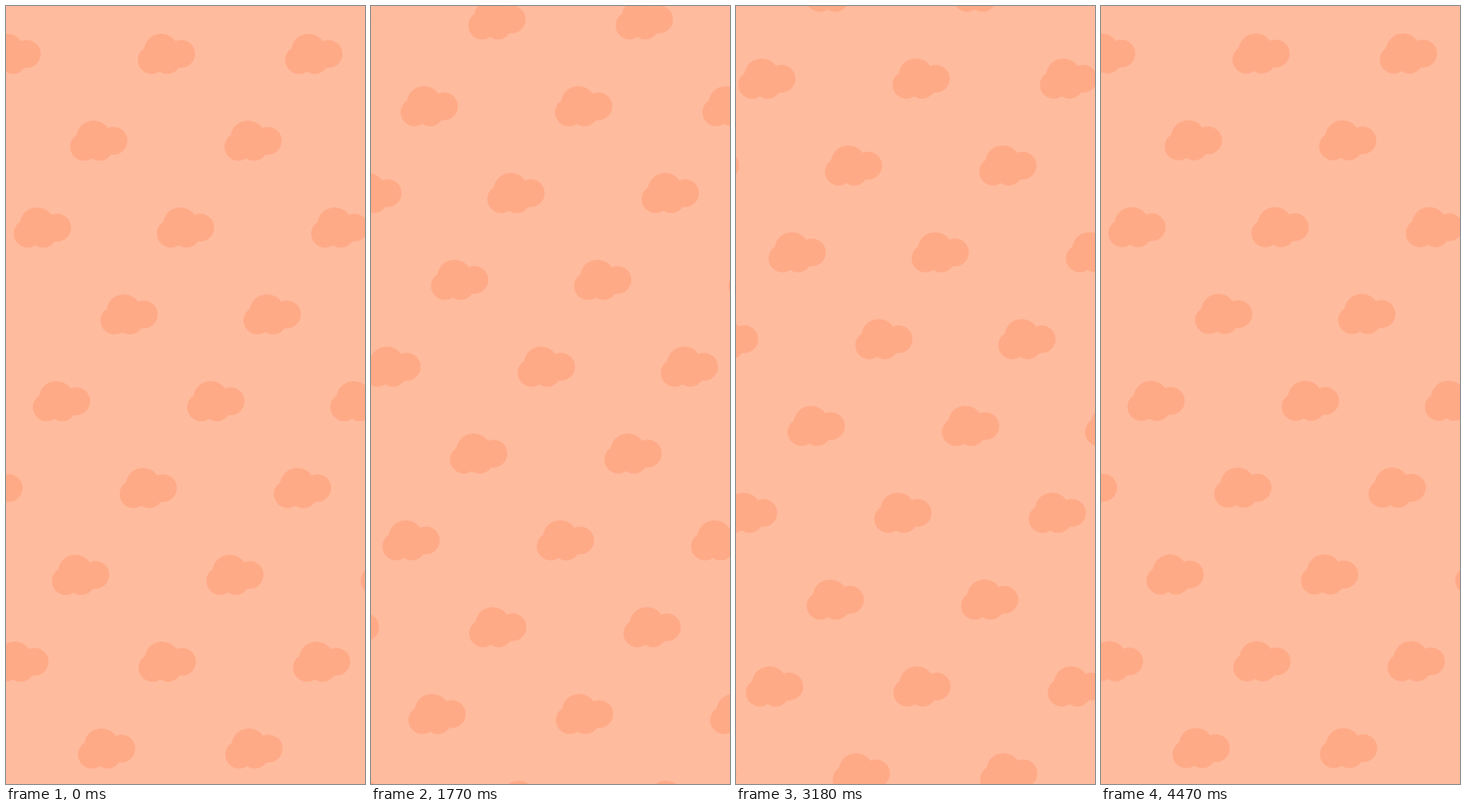
These frames come from a looping animation (414 by 896 pixels, 4500 ms). An HTML page with a canvas:

```html
<!DOCTYPE html>
<html lang="en">
<head>
<meta charset="utf-8">
<title>Drifting clouds</title>
<style>
html, body { margin: 0; width: 100%; height: 100%; overflow: hidden; background: #ffbb9e; }
canvas { display: block; }
</style>
</head>
<body>
<canvas id="sky" width="414" height="896"></canvas>
<script>
const W = 414, H = 896, LOOP = 4500;
const STEP = 100;        // row spacing, also the diagonal offset per row
const STEP_TIME = 4450;  // ms to drift by one row
const ROWS = 10, TOP = 32;

// Left edge of each diagonal of clouds on the first row
const diagonals = [-894, -717, -547, -369, -191, -26, 152, 322];
// Cloud lobes: x, y, radius
const lobes = [[27, 20, 20], [50, 23.2, 16], [16, 30.2, 16], [34, 30.2, 16]];

const ctx = document.getElementById('sky').getContext('2d');

function addCloud(x, y) {
  for (const [cx, cy, r] of lobes) {
    ctx.moveTo(x + cx + r, y + cy);
    ctx.arc(x + cx, y + cy, r, 0, Math.PI * 2);
  }
}

function draw(time) {
  const drift = STEP * time / STEP_TIME;
  ctx.fillStyle = '#ffbb9e';
  ctx.fillRect(0, 0, W, H);
  ctx.fillStyle = '#ffaa87';
  ctx.beginPath();
  for (let row = 0; row < ROWS; row++) {
    const shift = row * STEP - drift;
    for (const x of diagonals) {
      if (x + shift > -70 && x + shift < W) addCloud(x + shift, TOP + shift);
    }
  }
  ctx.fill();
}

const start = performance.now();
function tick() {
  draw((performance.now() - start) % LOOP);
  requestAnimationFrame(tick);
}
tick();
</script>
</body>
</html>
```
